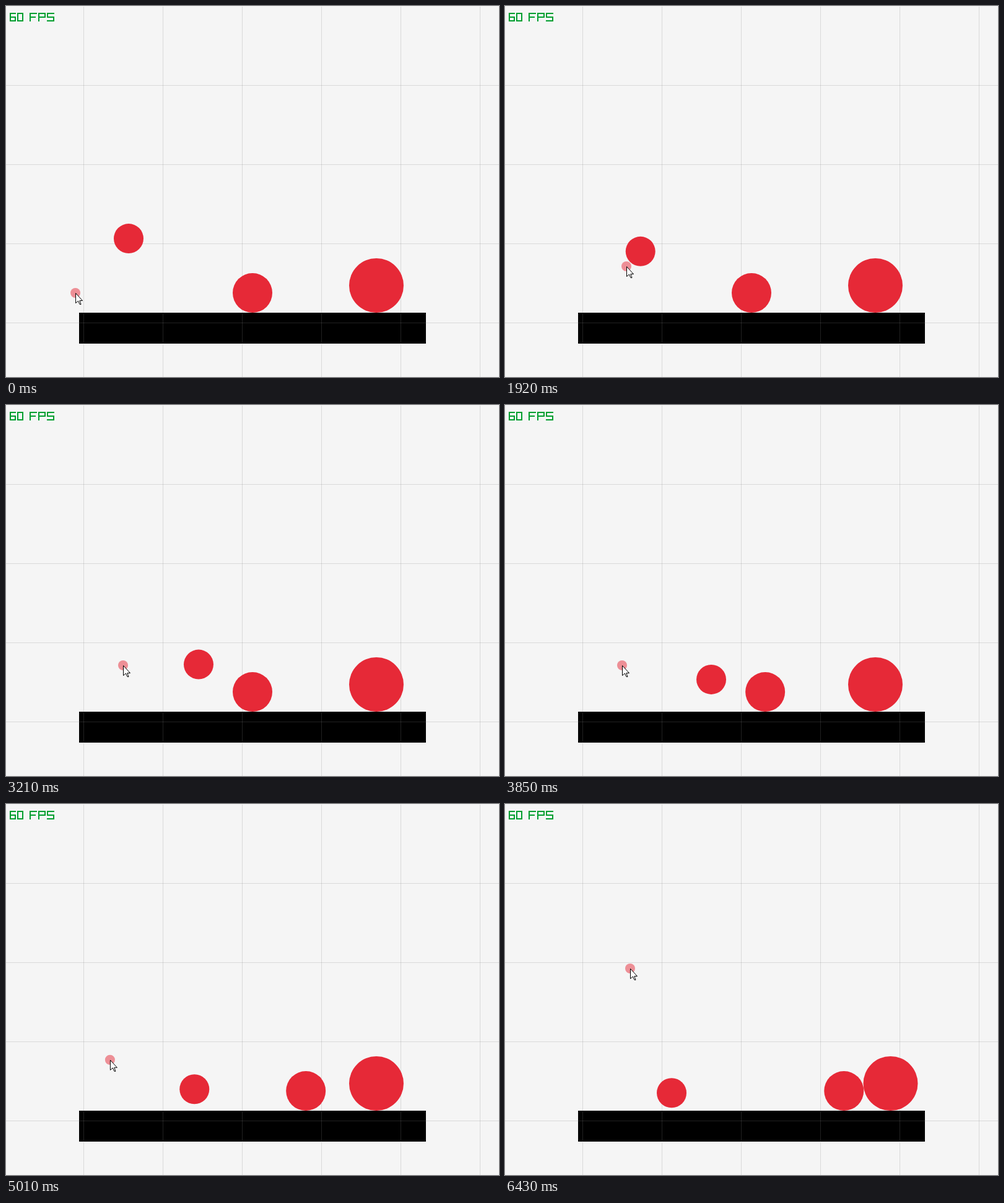
Write an HTML page that moves like this. It is 796x600 px and loops after 6.45 s.

```html
<!DOCTYPE html>
<html lang="en">
<head>
<meta charset="utf-8">
<title>Bouncing balls</title>
<style>
  html, body { margin: 0; width: 100%; height: 100%; overflow: hidden; background: #f5f5f5; }
  svg { display: block; }
  .grid { stroke: rgba(130, 130, 130, .25); }
  .ball { fill: #e62937; }
  .fps { fill: none; stroke: #009e2f; stroke-width: 2; stroke-linecap: square; }
</style>
</head>
<body>
<svg width="796" height="600" viewBox="0 0 796 600">
  <defs>
    <pattern id="cell" x="125" width="128" height="128" patternUnits="userSpaceOnUse">
      <path class="grid" d="M.5 0V128M0 .5H128"/>
    </pattern>
  </defs>
  <rect x="118" y="496" width="560" height="50"/>
  <rect y="1" width="796" height="599" fill="url(#cell)"/>
  <circle class="ball" id="small" r="24"/>
  <circle class="ball" id="medium" r="32"/>
  <circle class="ball" id="large" r="44"/>
  <g id="pointer">
    <circle class="ball" r="8" opacity=".5"/>
    <path d="M.5 .5V16.5L4.5 13L7 18.5H9L6.9 12.5H11.5Z" fill="#fff" stroke="#000"/>
  </g>
  <path class="fps" role="img" aria-label="60 FPS"
    d="M15 12H7V24H15V18H7M19 12H27V24H19ZM49 12H39V24M39 18H47M53 24V12H63V18H53M77 12H67V18H77V24H67"/>
</svg>
<script>
const LOOP = 6.45, GRAVITY = 360, BOUNCE = .84, FLOOR = 472;
const ROLL_START = 3.45, ROLL_SPEED = 55.2, TOUCH = 5.71, PUSH_SPEED = 34;

// Moments when something other than the floor changes the small ball's flight
const launches = [
  { t: 0, x: 198, y: 376, vx: 0, vy: 61.5 },
  { t: .58, x: 198, y: FLOOR, vx: 0, vy: -253 },
  { t: 1.673, x: 201, y: 410.8, vx: 71.5, vy: -101 },  // hit by the pointer
  { t: 3.55, x: 340.5, y: 455, vx: -24.8, vy: -91 }    // hits the medium ball
];

// Pointer path: [seconds, x, y]
const path = [
  [0, 112, 464], [.8, 149, 481], [1.4, 172, 473], [1.92, 196, 421], [2.4, 189, 421],
  [4.72, 189, 421], [5.01, 168, 414], [5.13, 157, 388], [5.33, 170, 323], [5.9, 202, 266]
];

function smallAt(t) {
  const from = launches.filter(l => l.t <= t).pop();
  let { y, vy } = from, left = t - from.t;
  for (;;) {
    const fall = (Math.sqrt(vy * vy + 2 * GRAVITY * (FLOOR - y)) - vy) / GRAVITY;
    if (fall > left) break;
    left -= fall;
    vy = -BOUNCE * (vy + GRAVITY * fall);
    y = FLOOR;
  }
  return [from.x + from.vx * (t - from.t), y + vy * left + GRAVITY * left * left / 2];
}

function pointerAt(t) {
  const i = path.findIndex(p => p[0] > t);
  if (i < 0) return path[path.length - 1].slice(1);
  const [t0, x0, y0] = path[i - 1], [t1, x1, y1] = path[i];
  const k = (t - t0) / (t1 - t0);
  return [x0 + (x1 - x0) * k, y0 + (y1 - y0) * k];
}

function place(id, [x, y]) {
  document.getElementById(id).setAttribute("transform", `translate(${x.toFixed(2)} ${y.toFixed(2)})`);
}

function draw(t) {
  if (t > 3.93 && t < 4.03) t = 3.93; // short stall
  const roll = Math.max(0, Math.min(t, TOUCH) - ROLL_START) * ROLL_SPEED;
  const push = Math.max(0, t - TOUCH) * PUSH_SPEED;
  place("small", smallAt(t));
  place("medium", [398 + roll + push, 464]);
  place("large", [598 + push, 452]);
  place("pointer", pointerAt(t));
}

const start = performance.now();
function tick() {
  draw((performance.now() - start) / 1000 % LOOP);
  requestAnimationFrame(tick);
}
tick();
</script>
</body>
</html>
```
